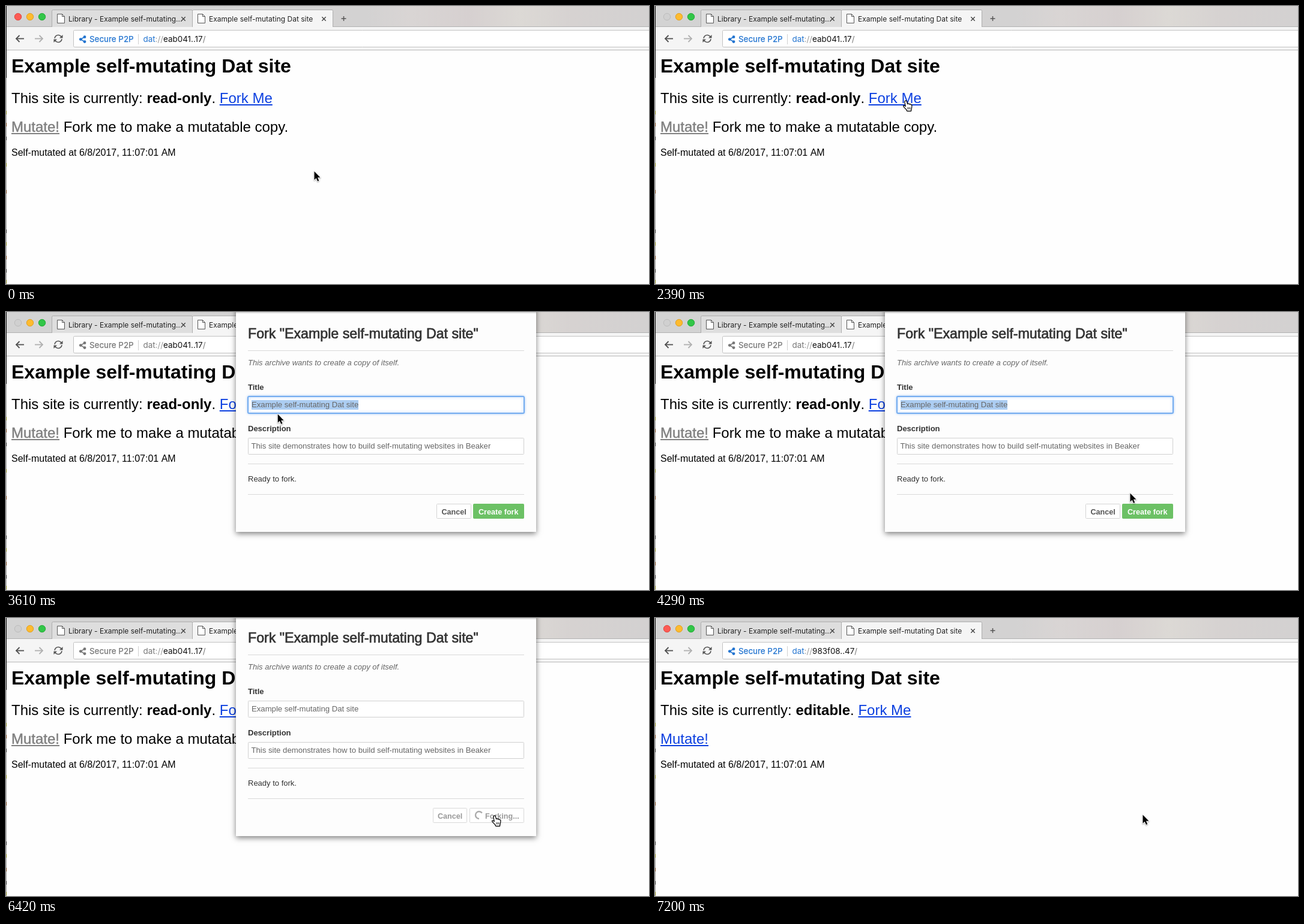
These frames come from a looping animation (1071x464 px, 8000 ms). An HTML page with a canvas:

```html
<!DOCTYPE html>
<html lang="en">
<head>
<meta charset="utf-8">
<title>Forking a site</title>
<style>
html, body { margin: 0; width: 100%; height: 100%; overflow: hidden; background: #fefefe; }
canvas { display: block; }
</style>
</head>
<body>
<canvas id="stage" width="1071" height="464"></canvas>
<script>
const ctx = document.getElementById('stage').getContext('2d');
const LOOP = 8000;
const SANS = '"Liberation Sans", Arial, sans-serif';
const UI = 'Inter, Roboto, sans-serif';
const LINK = '#0b3fe0';
const SHEET = { x: 383, w: 500, h: 367 };

// Pointer tip: start, end, from, to
const MOVES = [
  { t0: 870, t1: 1520, from: [513.5, 276], to: [416.5, 156.5] },
  { t0: 3440, t1: 4290, from: [416.5, 156.5], to: [791.5, 302.5] },
  { t0: 5130, t1: 5670, from: [791.5, 302.5], to: [812.5, 328.5] }
];

const clamp = u => Math.min(1, Math.max(0, u));
const progress = (t, a, b) => clamp((t - a) / (b - a));
const sine = u => (1 - Math.cos(Math.PI * u)) / 2;
const cubic = u => u < 0.5 ? 4 * u ** 3 : 1 - 4 * (1 - u) ** 3;

function rect(x, y, w, h, color) {
  ctx.fillStyle = color;
  ctx.fillRect(x, y, w, h);
}

function box(x, y, w, h, fill, border, radius = 1) {
  ctx.beginPath();
  ctx.roundRect(x + 0.5, y + 0.5, w - 1, h - 1, radius);
  ctx.fillStyle = fill;
  ctx.fill();
  ctx.strokeStyle = border;
  ctx.lineWidth = 1;
  ctx.stroke();
}

function disc(x, y, r, color, border) {
  ctx.beginPath();
  ctx.arc(x, y, r, 0, 7);
  ctx.fillStyle = color;
  ctx.fill();
  if (border) line(null, border, 1);
}

// Points are x, y pairs; null strokes the current path
function line(points, color, width) {
  if (points) {
    ctx.beginPath();
    for (let i = 0; i < points.length; i += 2) ctx.lineTo(points[i], points[i + 1]);
  }
  ctx.strokeStyle = color;
  ctx.lineWidth = width;
  ctx.stroke();
}

// Returns the x where the text ends
function text(str, x, y, font, color, heavy = 0) {
  ctx.font = font;
  ctx.fillStyle = color;
  ctx.fillText(str, x, y);
  if (heavy) {
    ctx.strokeStyle = color;
    ctx.lineWidth = heavy;
    ctx.strokeText(str, x, y);
  }
  return x + ctx.measureText(str).width;
}

function link(str, x, y, color, heavy) {
  const end = text(str, x, y, '24px ' + SANS, color, heavy);
  rect(x, y + 2, end - x, 2, color);
}

function drawTab(x, w, fill, title) {
  ctx.beginPath();
  ctx.moveTo(x + 0.5, 35);
  ctx.lineTo(x + 0.5, 8.5);
  ctx.quadraticCurveTo(x + 0.5, 6.5, x + 2.5, 6.5);
  ctx.lineTo(x + w - 2, 6.5);
  ctx.quadraticCurveTo(x + w - 0.5, 6.5, x + w - 0.5, 8.5);
  ctx.lineTo(x + w - 0.5, 35);
  ctx.fillStyle = fill;
  ctx.fill();
  line(null, '#adadad', 1);

  ctx.beginPath();
  ctx.moveTo(x + 9.5, 13.5);
  ctx.lineTo(x + 17.5, 13.5);
  ctx.lineTo(x + 21.5, 17.5);
  ctx.lineTo(x + 21.5, 28.5);
  ctx.lineTo(x + 9.5, 28.5);
  ctx.closePath();
  ctx.fillStyle = '#fff';
  ctx.fill();
  line(null, '#555', 1);
  line([x + 17.5, 13.5, x + 17.5, 17.5, x + 21.5, 17.5], '#555', 1);

  text(title, x + 28, 26, '12px ' + UI, '#222');
  const cx = x + w - 15.5;
  line([cx - 3.2, 18.3, cx + 3.2, 24.7], '#444', 1.4);
  line([cx + 3.2, 18.3, cx - 3.2, 24.7], '#444', 1.4);
}

function drawArrow(x, dir, color) {
  line([x - 6.5 * dir, 54.5, x + 6.5 * dir, 54.5], color, 1.8);
  line([x + dir, 49, x + 6.5 * dir, 54.5, x + dir, 60], color, 1.8);
}

function drawReload() {
  const color = '#555';
  for (const turn of [0, Math.PI]) {
    ctx.save();
    ctx.translate(87, 54.5);
    ctx.rotate(turn);
    ctx.beginPath();
    ctx.arc(0, 0, 6, Math.PI * 1.03, Math.PI * 1.82);
    line(null, color, 1.7);
    ctx.beginPath();
    ctx.moveTo(7.5, -6.5);
    ctx.lineTo(7.5, -1);
    ctx.lineTo(2, -1);
    ctx.fillStyle = color;
    ctx.fill();
    ctx.restore();
  }
}

function drawChrome(t) {
  const strip = ctx.createLinearGradient(0, 0, 1071, 0);
  [[0, '#d3d3d3'], [0.56, '#d3d2d2'], [0.63, '#d9d5d4'], [0.72, '#d6d0d0'],
   [0.8, '#dcd9d5'], [0.88, '#d6d2d1'], [1, '#d3d1d1']].forEach(s => strip.addColorStop(...s));
  rect(0, 0, 1071, 35, strip);
  rect(0, 34, 1071, 1, '#b2b2b2');

  const closeable = t < 2390 || t >= 6900;
  disc(20, 18, 5.7, closeable ? '#fc5b54' : '#d0d0d0', closeable ? '#e2463f' : '#bcbcbc');
  disc(40, 18, 5.7, '#fdbb2f', '#e0a023');
  disc(60, 18, 5.7, '#32c648', '#24ab35');

  drawTab(76, 235, '#dedede', 'Library - Example self-mutating...');
  rect(0, 35, 1071, 38, '#f5f5f5');
  drawTab(310, 235, '#f5f5f5', 'Example self-mutating Dat site');
  line([558.5, 21, 566.5, 21], '#555', 1.5);
  line([562.5, 17, 562.5, 25], '#555', 1.5);
  rect(0, 73, 1071, 1, '#b8b8b8');

  drawArrow(23.5, -1, '#505050');
  drawArrow(54.5, 1, '#b0b0b0');
  drawReload();
  box(112, 40, 980, 29, '#fff', '#c2c2c2', 2);

  const active = t < 2450 || t >= 6900;
  const accent = active ? '#2274d0' : '#777';
  line([131, 51.5, 124.5, 55.5, 131, 59.8], accent, 1.5);
  disc(131, 51.7, 2.4, accent);
  disc(124.3, 55.6, 2.4, accent);
  disc(131, 59.6, 2.4, accent);
  const font = '13.4px ' + UI;
  text('Secure P2P', 139, 60, font, accent, 0.25);
  rect(220, 47, 1, 17, '#d0d0d0');
  let x = text('dat', 228.5, 60, font, accent);
  x = text('://', x, 60, font, '#999');
  x = text(t < 7200 ? 'eab041..17' : '983f08..47', x, 60, font, '#111');
  text('/', x, 60, font, '#777');
}

function drawPage(t) {
  const forked = t >= 7200;
  const body = '24px ' + SANS;
  text('Example self-mutating Dat site', 9, 111, 'bold 32px ' + SANS, '#000');
  let x = text('This site is currently: ', 9, 162, body, '#000');
  x = text(forked ? 'editable' : 'read-only', x, 162, 'bold 24px ' + SANS, '#000');
  x = text('. ', x, 162, body, '#000');
  link('Fork Me', x, 162, t >= 1910 && t < 1970 ? '#f00' : LINK);
  if (forked) {
    link('Mutate!', 9, 210, LINK);
  } else {
    link('Mutate!', 9, 210, '#808080', 0.5);
    text('Fork me to make a mutatable copy.', 95.7, 210, body, '#000');
  }
  text('Self-mutated at 6/8/2017, 11:07:01 AM', 9, 250, '16px ' + SANS, '#000');
}

// Sliver of desktop left of the window
function drawEdge() {
  rect(0, 0, 1, 464, '#a8a8a8');
  rect(0, 0, 1, 120, '#111');
  [178, 198, 221, 265, 310, 376, 397, 420, 442, 460].forEach((y, i) =>
    rect(0, y - 3, 1, 6, ['#8a8a20', '#7a4a20', '#333'][i % 3]));
}

function drawButton(x, w, label, textX, fill, border, color) {
  box(x, 320, w, 25, fill, border);
  text(label, textX, 338, 'bold 12.6px ' + SANS, color);
}

function drawForm(t) {
  const busy = t >= 6180;
  const small = '13px ' + SANS, bold = 'bold 13px ' + SANS, input = '13.15px ' + SANS;
  text('Fork "Example self-mutating Dat site"', 403, 44, '23.2px ' + SANS, '#333', 0.7);
  for (const y of [64, 253, 304]) rect(403, y, 460, 1, '#d9d9d9');
  text('This archive wants to create a copy of itself.', 403, 89, 'italic ' + small, '#666');

  text('Title', 403, 130, bold, '#333');
  if (busy) {
    box(403, 141, 460, 28, '#fff', '#d0d0d0');
  } else {
    ctx.save();
    ctx.shadowColor = 'rgba(80,150,240,.8)';
    ctx.shadowBlur = 4;
    box(403, 141, 460, 28, '#fff', '#6ba6ee');
    ctx.restore();
    ctx.beginPath();
    ctx.roundRect(403, 141, 460, 28, 2);
    line(null, '#75adf0', 2);
    rect(409, 147, 178, 16, '#accdf2');
  }
  text('Example self-mutating Dat site', 409, 159, input, '#666');

  text('Description', 403, 199, bold, '#333');
  box(403, 210, 460, 28, '#fff', '#d0d0d0');
  text('This site demonstrates how to build self-mutating websites in Beaker', 408.5, 228, input, '#666');
  text('Ready to fork.', 403, 283, small, '#333');

  if (busy) {
    drawButton(711, 57, 'Cancel', 719, '#fff', '#d9d9d9', '#999');
    drawButton(772, 91, 'Forking...', 798, '#fff', '#d9d9d9', '#999');
    ctx.beginPath();
    ctx.arc(788, 332, 6, Math.PI * 0.5, Math.PI * 1.8);
    line(null, '#aaa', 2.4);
  } else {
    const h = progress(t, 5450, 5600);
    const green = `rgb(${108 - 14 * h},${193 - 18 * h},${101 - 13 * h})`;
    drawButton(717, 58, 'Cancel', 725.5, '#fff', '#d4d4d4', '#555');
    drawButton(778, 85, 'Create fork', 787, green, green, '#fff');
  }
}

function sheetShown(t) {
  return cubic(progress(t, 2410, 2840)) - cubic(progress(t, 6360, 6860));
}

function drawSheet(t) {
  const shown = sheetShown(t);
  if (shown <= 0) return;
  ctx.save();
  ctx.translate(0, Math.round((shown - 1) * SHEET.h));
  ctx.save();
  ctx.shadowColor = 'rgba(0,0,0,.5)';
  ctx.shadowBlur = 9;
  ctx.shadowOffsetY = 3;
  rect(SHEET.x, -20, SHEET.w, SHEET.h + 20, '#fdfdfd');
  ctx.restore();
  if (t >= 2930) drawForm(t);
  ctx.restore();
  const top = ctx.createLinearGradient(0, 0, 0, 3);
  top.addColorStop(0, 'rgba(0,0,0,.2)');
  top.addColorStop(1, 'rgba(0,0,0,0)');
  rect(SHEET.x, 0, SHEET.w, 3, top);
}

const ARROW = new Path2D('M0 0V14.2L3.2 11.2L5.5 16.4L7.8 15.4L5.5 10.3H10Z');
const HAND = new Path2D('M-.6 4C-1 1.2 2.2.6 3 3L4 7.2C5 6 6.8 6.2 7 7.6C8.2 6.6 9.3 7 9.6 8.4' +
  'C10.8 7.9 11.5 8.6 11.4 10C11.5 13 10.3 14.5 10 18.8H3.4C2.6 15.5-1 13.5-2.8 11C-3.5 9.3-1.5 9 .8 11Z');
const KNUCKLES = new Path2D('M4.4 12.5V16M6.4 12.5V16M8.4 12.5V16');

function pointerAt(t) {
  let [x, y] = MOVES[0].from;
  for (const m of MOVES) {
    if (t < m.t0) break;
    const u = sine(progress(t, m.t0, m.t1));
    x = m.from[0] + (m.to[0] - m.from[0]) * u;
    y = m.from[1] + (m.to[1] - m.from[1]) * u;
  }
  const onLink = t < 2630 && y < 167;
  const onButton = t > 5000 && t < 6900 && y > 320;
  return { x, y, hand: onLink || onButton };
}

function drawPointer(t) {
  const p = pointerAt(t);
  ctx.save();
  ctx.translate(p.x, p.y);
  ctx.lineJoin = 'round';
  ctx.save();
  ctx.shadowColor = 'rgba(0,0,0,.35)';
  ctx.shadowBlur = 2;
  ctx.shadowOffsetY = 1;
  ctx.fillStyle = '#fff';
  ctx.strokeStyle = '#fff';
  ctx.lineWidth = 2;
  if (!p.hand) ctx.stroke(ARROW);
  else ctx.fill(HAND);
  ctx.restore();
  ctx.fillStyle = '#000';
  ctx.strokeStyle = '#000';
  if (p.hand) {
    ctx.lineWidth = 1.2;
    ctx.stroke(HAND);
    ctx.lineWidth = 0.8;
    ctx.stroke(KNUCKLES);
  } else {
    ctx.fill(ARROW);
  }
  ctx.restore();
}

const start = performance.now();

function frame() {
  const t = (performance.now() - start) % LOOP;
  rect(0, 0, 1071, 464, '#fefefe');
  drawPage(t);
  drawChrome(t);
  drawEdge();
  drawSheet(t);
  drawPointer(t);
  requestAnimationFrame(frame);
}
frame();
</script>
</body>
</html>
```
